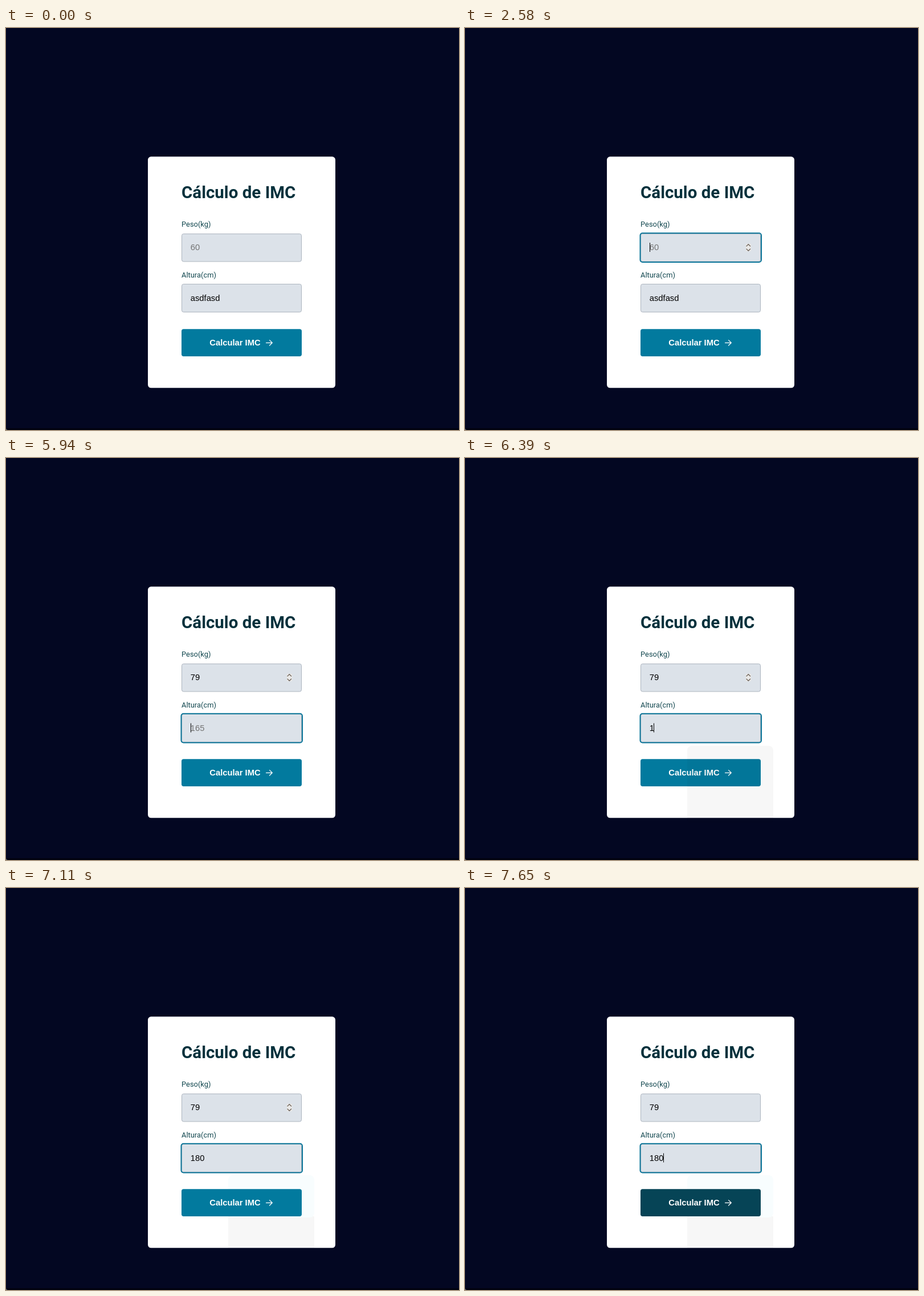
An HTML page that plays this animation: 795x704 px, repeating every 8000 ms.

```html
<!DOCTYPE html>
<html lang="pt-BR">
<head>
<meta charset="utf-8">
<title>Cálculo de IMC</title>
<style>
  html, body { margin: 0; width: 100%; height: 100%; overflow: hidden; background: #030722; }
  svg { display: block; width: 795px; height: 704px; }
  .title { font: 700 29.5px Roboto, sans-serif; fill: #06313c; }
  .label { font: 400 12.9px Roboto, sans-serif; fill: #12474f; }
  .value { font: 400 14.75px "Liberation Sans", Arial, sans-serif; fill: #000; }
  .value.hint { fill: #757575; }
  .value.picked { fill: #fff; }
  .action { font: 700 14.75px "Liberation Sans", Arial, sans-serif; fill: #fff; }
  .option { font: 600 10.8px "Open Sans", sans-serif; fill: #fff; }
  .box { fill: #dce2e9; stroke: #adb5bf; }
  .ring { fill: none; stroke: #0a7599; stroke-width: 2; }
  .line { fill: none; stroke-linecap: round; stroke-linejoin: round; }
</style>
</head>
<body>
<svg viewBox="0 0 795 704">
  <rect width="795" height="704" fill="#030722"/>
  <rect y="701" width="795" height="3" fill="#01020f"/>
  <path d="M0 700Q0 704 4 704H0Z" fill="#6d6f7c"/>

  <rect x="249" y="225.3" width="329" height="405" rx="5.5" fill="#fff"/>
  <path id="ghostLow" d="M390 575H541V630H390Z" fill="#f7f7f7"/>
  <rect id="ghostTop" x="390" y="503" width="151" height="74" rx="8" fill="#f8fdfe"/>

  <text class="title" x="308" y="298">Cálculo de IMC</text>
  <text class="label" x="308" y="348">Peso(kg)</text>
  <text class="label" x="308" y="436.5">Altura(cm)</text>

  <g>
    <rect class="box" x="308.5" y="360.5" width="210" height="48.5" rx="3.2"/>
    <rect id="ringPeso" class="ring" x="307.5" y="359.3" width="212.5" height="50.7" rx="4"/>
    <text id="peso" class="value" x="323.75" y="389"></text>
    <g id="spinner">
      <rect x="493" y="378" width="9" height="13" fill="#e9e8e7"/>
      <path id="arrows" class="line" d="M494 382l3.3-3.2 3.3 3.2M494 387l3.3 3.2 3.3-3.2" stroke-width="1.3"/>
    </g>
  </g>

  <g>
    <rect class="box" x="308.5" y="448.5" width="210" height="49" rx="3.2"/>
    <rect id="ringAltura" class="ring" x="307.5" y="447.8" width="212.5" height="50.7" rx="4"/>
    <rect id="selection" x="324" y="464" width="52" height="17" fill="#0078d7"/>
    <text id="altura" class="value" x="323.75" y="477.5"></text>
  </g>
  <rect id="caret" width="1" fill="#000"/>

  <rect id="button" x="308" y="527.3" width="211" height="47.7" rx="3.7"/>
  <text class="action" x="357.3" y="556">Calcular IMC</text>
  <path class="line" d="M456.5 551.3H467.3M462.5 546.6L467.3 551.3L462.5 556" stroke="#fff" stroke-width="1.2"/>

  <rect id="fade" x="390" y="504" width="151" height="136" rx="8" fill="#000" opacity=".032"/>
  <g id="popup">
    <rect x="393.5" y="505.5" width="144.5" height="67.5" rx="7.5" fill="#000" stroke="#4a4a4a"/>
    <path d="M404.5 506.5L412.5 498.8L420.5 506.5Z" fill="#000"/>
    <text class="option" x="405" y="526.5">180</text>
    <text class="option" x="405" y="559.5">182</text>
  </g>
</svg>
<script>
const LOOP = 8000;
const CARET_X = [324, 331, 339, 348];
const $ = id => document.getElementById(id);

const start = {
  peso: "", altura: "asdfasd", focus: "", caret: false, selection: false,
  spinner: false, arrows: "#6f655c", button: "#027a9e",
  fade: false, popup: false, ghostLow: false, ghostTop: false
};

// Each entry changes part of the state at its time in ms.
const steps = [
  [1050, { spinner: true }],
  [1110, { arrows: "#57504a" }],
  [1260, { arrows: "#6f655c" }],
  [1560, { focus: "peso", caret: true }],
  [2070, { caret: false }],
  [2580, { caret: true }],
  [3090, { caret: false }],
  [3570, { peso: "7", caret: true }],
  [3750, { peso: "79" }],
  [4260, { caret: false }],
  [4770, { caret: true }],
  [4920, { focus: "altura", caret: false, selection: true }],
  [5910, { altura: "", selection: false, caret: true }],
  [6390, { altura: "1", fade: true }],
  [6450, { altura: "18", fade: false, popup: true, ghostLow: true }],
  [6600, { altura: "180", popup: false, ghostTop: true }],
  [7110, { caret: false }],
  [7260, { spinner: false }],
  [7500, { button: "#03627f" }],
  [7560, { button: "#04556d" }],
  [7620, { button: "#054a5f", caret: true }],
  [7650, { button: "#064456" }]
];

const show = (id, on) => { $(id).style.display = on ? "" : "none"; };

function write(id, text, hint, picked) {
  const node = $(id);
  node.textContent = text || hint;
  node.classList.toggle("hint", !text);
  node.classList.toggle("picked", picked);
}

function draw(s) {
  write("peso", s.peso, "60", false);
  write("altura", s.altura, "165", s.selection);
  show("ringPeso", s.focus === "peso");
  show("ringAltura", s.focus === "altura");
  for (const id of ["caret", "selection", "spinner", "fade", "popup", "ghostLow", "ghostTop"]) show(id, s[id]);
  if (s.caret) {
    const inPeso = s.focus === "peso";
    $("caret").setAttribute("x", CARET_X[s[s.focus].length]);
    $("caret").setAttribute("y", inPeso ? 376 : 464.5);
    $("caret").setAttribute("height", 16);
  }
  $("arrows").style.stroke = s.arrows;
  $("button").style.fill = s.button;
}

const origin = performance.now();
let shown = -1;

function tick() {
  const t = (performance.now() - origin) % LOOP;
  const count = steps.filter(([at]) => at <= t).length;
  if (count !== shown) {
    shown = count;
    draw(Object.assign({}, start, ...steps.slice(0, count).map(([, change]) => change)));
  }
  requestAnimationFrame(tick);
}
tick();
</script>
</body>
</html>
```
